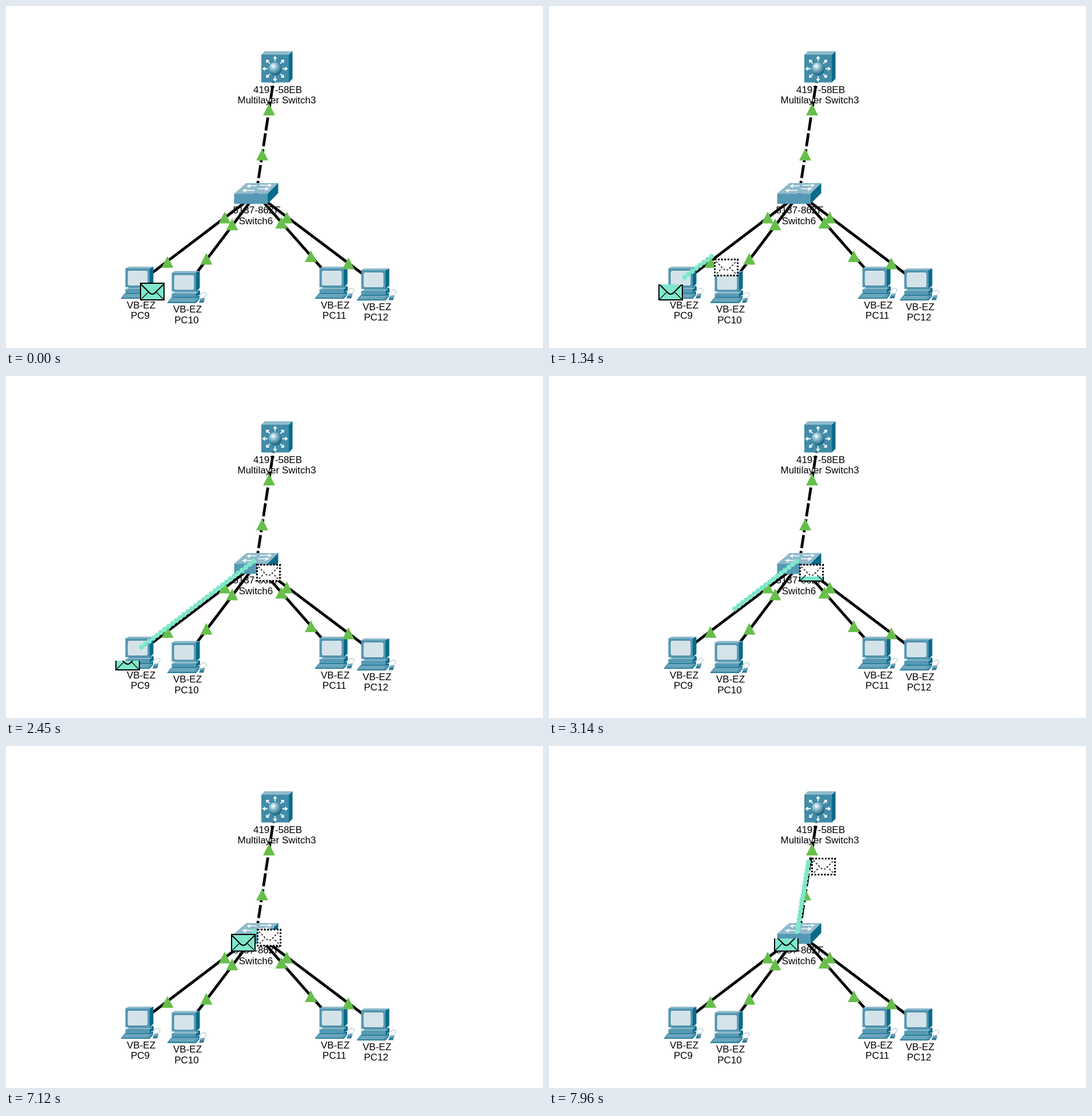
These frames come from a looping animation (938 by 597 pixels, 8000 ms). An HTML page:

```html
<!DOCTYPE html>
<html lang="en">
<head>
<meta charset="utf-8">
<title>Packet on a network</title>
<style>
  html, body { margin: 0; width: 100%; height: 100%; overflow: hidden; background: #fff; }
  #stage { display: block; width: 100%; height: 100%; }
  text { font: 17px "Liberation Sans", Arial, sans-serif; text-anchor: middle; }
  .front { fill: #5599b4; }
  .top { fill: #8fbacb; }
  .side { fill: #086b89; }
  .arrow { fill: none; stroke: #fff; }
</style>
</head>
<body>
<svg id="stage" viewBox="0 0 938 597">
  <defs>
    <radialGradient id="ball" cx=".36" cy=".3" r=".75">
      <stop offset="0" stop-color="#fff"/>
      <stop offset=".35" stop-color="#8fbfd2"/>
      <stop offset="1" stop-color="#0b5876"/>
    </radialGradient>
    <g id="pc">
      <path d="M262 503C271 499 271 492 265 493S258 499 256 497" fill="none" stroke="#9db6c1"/>
      <path class="side" d="M251 458L257.500 455V485L251 491ZM214 491H251L257 488V491L251 495H214ZM251 494.500L258 490V496L251 500.500ZM210 500.500H251L257 498V502H207Z"/>
      <path class="top" d="M208.500 458L214 455H257.500L251 458ZM208.500 494.500L214 491.500H256L251 494.500Z"/>
      <path class="front" d="M208.500 458H251V491H208.500ZM208.500 494.500H251V500.500H208.500Z"/>
      <rect x="212" y="461.500" width="36" height="27" rx="3.500" fill="#d4e3ea" stroke="#3e819c"/>
      <path class="front" d="M207 502H257L250 509.500H201Z"/>
      <path class="side" d="M201 509.500H250L257 502V504L251 511H201Z"/>
      <path d="M208 504.500H250M206 507H247" stroke="#8fbacb"/>
      <path d="M259 502.500H266.500L264 510.500H256Z" fill="#347f9b"/>
      <path d="M259 503H266L264.500 506H258Z" fill="#71a9bf"/>
    </g>
    <path id="tri" d="M0 -10.500L10.500 10H-10.500Z" fill="#67be4b"/>
    <path id="spoke" class="arrow" d="M13 0H20M17.500 -2.800L21 0L17.500 2.800" stroke-width="1.800"/>
    <g id="mail" fill="none" stroke="#000">
      <rect x="1" y="1" width="41" height="29" fill="#7fe7cb" stroke-width="2"/>
      <path d="M2 3L15 16Q21.500 24 28 16L41 3" stroke-width="2"/>
      <path d="M2 29L14 17M41 29L29 17" stroke-width="1.300"/>
    </g>
  </defs>

  <g id="links" stroke="#000" stroke-width="4.800"></g>

  <path class="front" d="M446 85H494V133.500H446Z" style="fill:#418ca8"/>
  <path class="top" d="M446 85L452 79H500.500L494 85Z"/>
  <path class="side" d="M494 85L500.500 79V127L494 133.500Z"/>
  <g id="spokes"></g>
  <circle cx="470" cy="109.500" r="11.300" fill="url(#ball)"/>

  <path class="top" d="M398.500 327.500L420 309H475.500L457 327.500Z"/>
  <path class="front" d="M398.500 327.500H457V345.500H398.500Z"/>
  <path class="side" d="M457 327.500L475.500 309V326.500L457 345.500Z"/>
  <path class="arrow" stroke-width="1.600" d="M443 313H462M458 311L463 313L458 316M440 319H457M453 317L458 319L452 322M423 314H438M427 312L422 314L426 317M415 322H434M420 320L414 322L419 325"/>

  <g id="devices"></g>
  <g id="marks"></g>
  <g id="labels"></g>
  <path id="trail" fill="none" stroke="#7fe7cb" stroke-width="9" stroke-linecap="round"/>
  <g id="ghost" fill="none" stroke="#000">
    <rect x="1.500" y="1.500" width="40" height="28" fill="#fff" stroke-width="3" stroke-dasharray="3 2.600"/>
    <path d="M4 5L15 16Q21.500 24 28 16L39 5M5 26L14 17M38 26L29 17" stroke-width="1.500" stroke-dasharray="3 3"/>
  </g>
  <svg id="solid" width="43" height="31"><use href="#mail"/></svg>
</svg>
<script>
const $ = id => document.getElementById(id);
const add = (id, markup) => $(id).insertAdjacentHTML("beforeend", markup);
const label = (x, y, s) => add("labels", `<text x="${x}" y="${y}">${s}</text>`);
const link = (x, y, dash = "none") =>
  add("links", `<path d="M437 328L${x} ${y}" stroke-dasharray="${dash}"/>`);

// Static network
link(471, 106, "23 5");
[[0, 0, 9], [81, 7.5, 10], [339, 0, 11], [412, 3, 12]].forEach(([x, y, n]) => {
  link(234 + x, 482 + y);
  add("devices", `<use href="#pc" x="${x}" y="${y}"/>`);
  label(236 + x, 527.5 + y, "VB-EZ");
  label(234.5 + x, 546 + y, "PC" + n);
});
[[459.5, 181], [447.5, 259.5], [382, 369.5], [395, 381.5], [282, 447], [350, 441.5],
 [481, 378.5], [490.5, 369.5], [532.5, 437], [598, 449.5]].forEach(([x, y]) =>
  add("marks", `<use href="#tri" x="${x}" y="${y}"/>`));
for (let a = 0; a < 360; a += 45)
  add("spokes", `<use href="#spoke" transform="translate(470 109.500) rotate(${a})"/>`);
label(474.5, 151.5, "4197-58EB");
label(473, 170, "Multilayer Switch3");
label(438, 362, "5137-86ZF");
label(436.5, 381, "Switch6");

// Packet
const LOOP = 8000, TRIP = 1441, DOTS = 30, DRAIN = 2440;
const SHIFTS = [0, 1000, 1340, 1820, 3490, 7120];
const hops = [
  { start: 955, from: [234, 482.5], to: [436.5, 327.5], lift: -4 },
  { start: 7066, from: [436.5, 327.5], to: [471, 113.5], lift: 3.5 }
];
const clamp = v => Math.max(0, Math.min(1, v));
const along = (hop, p) => hop.from.map((v, i) => v + (hop.to[i] - v) * p);

// The picture advances in 70 ms ticks
function tick(t) {
  const base = SHIFTS.filter(s => s <= t).pop();
  return base + Math.floor((t - base) / 70) * 70;
}

function setSolid([x, y], cut) {
  const el = $("solid");
  el.setAttribute("x", Math.round(x));
  el.setAttribute("y", Math.round(y + cut));
  el.setAttribute("height", Math.max(0, 31 - Math.round(cut)));
  el.firstElementChild.setAttribute("y", -Math.round(cut));
}

function draw(time) {
  const t = tick(time), second = t >= 7120, hop = hops[+second];
  const raw = (t - hop.start) / TRIP, p = clamp(raw);
  const drained = second ? 0 : clamp((t - DRAIN) / TRIP);
  const moving = t >= 1000 && drained < 1;
  const [x, y] = along(hop, p);

  $("ghost").style.display = moving ? "" : "none";
  $("ghost").setAttribute("transform", `translate(${Math.round(x)} ${Math.round(y)})`);

  let d = "";
  for (let n = 1; moving && n <= Math.floor(p * DOTS + 1e-6); n++) {
    if (n / DOTS <= drained) continue;
    const [dx, dy] = along(hop, n / DOTS);
    d += `M${dx - 4} ${dy + hop.lift}h.01`;
  }
  $("trail").setAttribute("d", d);

  if (t < 1000) setSolid(hop.from, 0);
  else if (!moving) setSolid(hop.to, 0);
  else if (second || t < 2590)
    setSolid([hop.from[0] - 43.5, hop.from[1]], Math.max(0, 14.5 * raw - 0.7));
  else setSolid(hop.to, 31 - 20 * drained);
}

const begin = performance.now();
function frame() {
  draw((performance.now() - begin) % LOOP);
  requestAnimationFrame(frame);
}
frame();
</script>
</body>
</html>
```
